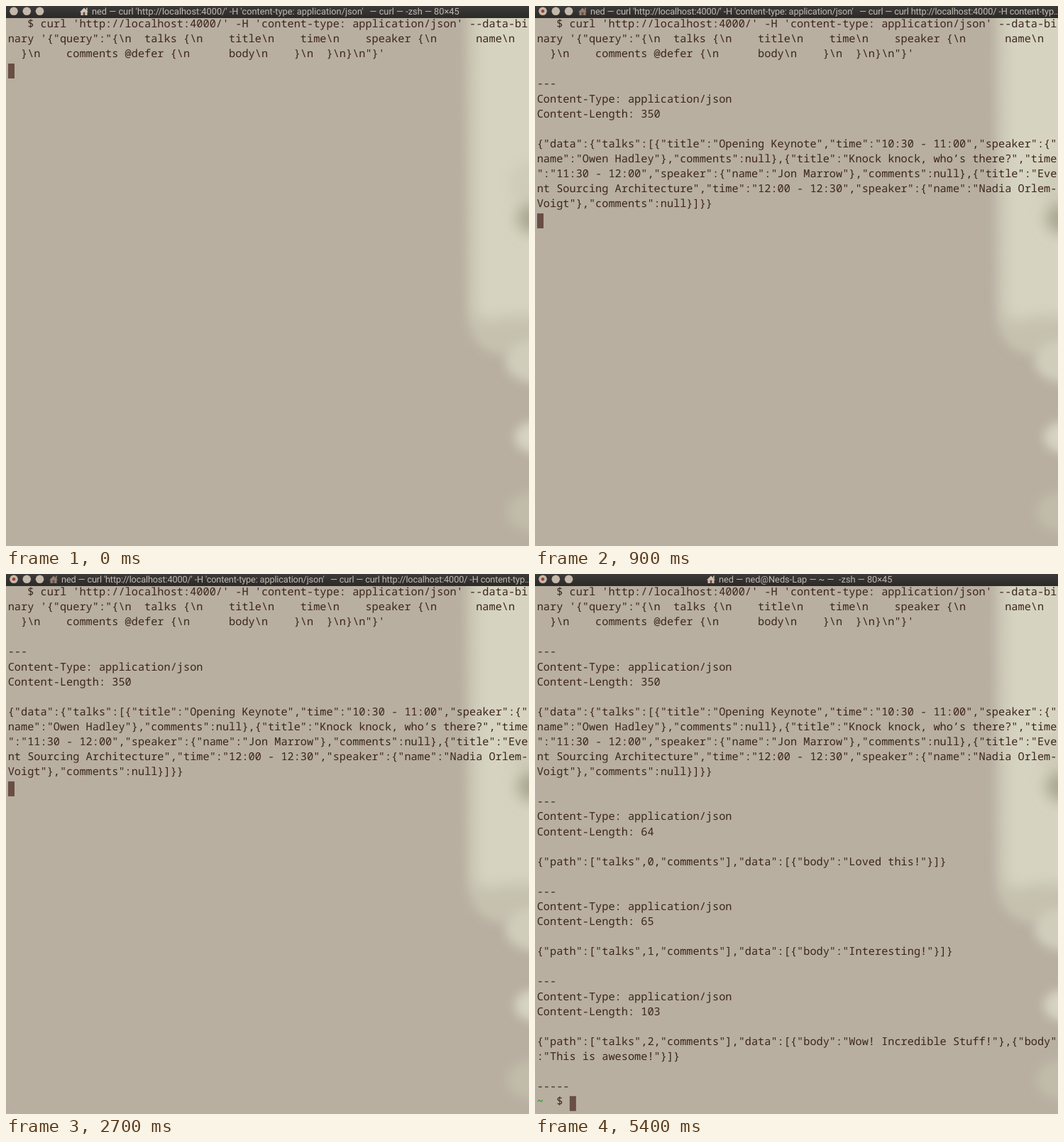
These frames come from a looping animation (737x760 px, 5.58 s). An HTML page:

```html
<!DOCTYPE html>
<html lang="en">
<head>
<meta charset="utf-8">
<title>Deferred query in a terminal</title>
<style>
  html, body { margin: 0; width: 100%; height: 100%; overflow: hidden; background: #b8afa1; }
  #stage { position: relative; width: 737px; height: 760px; overflow: hidden; }
  svg { position: absolute; left: 0; top: 0; }

  pre {
    position: absolute; left: 2.7px; top: 15.1px; margin: 0;
    font: 400 15.28px/21.09px "Noto Sans Mono", "DejaVu Sans Mono", monospace;
    color: #3d251d; text-rendering: geometricPrecision;
    font-variant-ligatures: none;
  }
  .reply { font-weight: 500; }
  .first { top: 99.46px; }
  .rest { top: 310.36px; }
  .home { color: #2f981f; font-weight: 700; }

  #cursor {
    position: absolute; left: 2.7px; top: 80.5px;
    width: 9.2px; height: 21px; background: #684e45;
  }

  .title text {
    font: 400 12.8px Roboto, "Liberation Sans", sans-serif;
    fill: #c3bab0; white-space: pre; text-rendering: geometricPrecision;
  }
  .title .tight { letter-spacing: -.17px; }

  /* One loop: 60, 120, 4560 and 4680 ms of 5580 ms */
  .first, .rest, #cursor, .title, #dot { animation: 5580ms step-end infinite; }
  .first { animation-name: reply; }
  .rest { animation-name: done; }
  #cursor { animation-name: cursor; }
  #t1 { animation-name: t1; }
  #t2 { animation-name: t2; }
  #t3 { animation-name: t3; }
  #t4 { animation-name: t4; }
  #dot { animation-name: dot; }

  @keyframes reply { 0% { visibility: hidden } 1.0752%, 100% { visibility: visible } }
  @keyframes done { 0% { visibility: hidden } 81.7204%, 100% { visibility: visible } }
  @keyframes dot { 0% { visibility: hidden } 2.1505%, 100% { visibility: visible } }
  @keyframes cursor {
    0% { transform: none }
    1.0752% { transform: translate(0, 210.9px) }
    81.7204%, 100% { transform: translate(45.85px, 653.8px) }
  }
  @keyframes t1 { 0% { visibility: visible } 2.1505%, 100% { visibility: hidden } }
  @keyframes t2 {
    0% { visibility: hidden } 2.1505% { visibility: visible } 81.7204%, 100% { visibility: hidden }
  }
  @keyframes t3 {
    0% { visibility: hidden } 81.7204% { visibility: visible } 83.8709%, 100% { visibility: hidden }
  }
  @keyframes t4 { 0% { visibility: hidden } 83.8709%, 100% { visibility: visible } }
</style>
</head>
<body>
<div id="stage">
  <svg width="737" height="760" viewBox="0 0 737 760">
    <defs>
      <filter id="soft" x="-60%" y="-60%" width="220%" height="220%"><feGaussianBlur stdDeviation="7"/></filter>
      <filter id="softer" x="-100%" y="-60%" width="300%" height="220%"><feGaussianBlur stdDeviation="10"/></filter>
    </defs>
    <path d="M648-40H790V492H705Q655 488 650 435Z" fill="#c6c1af" filter="url(#soft)"/>
    <path d="M662-40H790V436H700Q668 452 662 425Z" fill="#d6d4c1" filter="url(#softer)"/>
    <ellipse cx="748" cy="250" rx="40" ry="34" fill="#c9c5b2" opacity=".55" filter="url(#softer)"/>
    <ellipse cx="743" cy="299" rx="23" ry="21" fill="#a9a48f" filter="url(#softer)"/>
    <ellipse cx="745" cy="500" rx="41" ry="30" fill="#d0cdbb" filter="url(#soft)"/>
    <ellipse cx="744" cy="607" rx="27" ry="22" fill="#d6d3c1" filter="url(#soft)"/>
    <ellipse cx="741" cy="712" rx="34" ry="28" fill="#c1bca9" filter="url(#soft)"/>
  </svg>

<pre>   $ curl 'http://localhost:4000/' -H 'content-type: application/json' --data-bi
nary '{"query":"{\n  talks {\n    title\n    time\n    speaker {\n      name\n  
  }\n    comments @defer {\n      body\n    }\n  }\n}\n"}'</pre>

<pre class="reply first">---
Content-Type: application/json
Content-Length: 350

{"data":{"talks":[{"title":"Opening Keynote","time":"10:30 - 11:00","speaker":{"
name":"Owen Hadley"},"comments":null},{"title":"Knock knock, who’s there?","time
":"11:30 - 12:00","speaker":{"name":"Jon Marrow"},"comments":null},{"title":"Eve
nt Sourcing Architecture","time":"12:00 - 12:30","speaker":{"name":"Nadia Orlem-
Voigt"},"comments":null}]}}</pre>

<pre class="reply rest">---
Content-Type: application/json
Content-Length: 64

{"path":["talks",0,"comments"],"data":[{"body":"Loved this!"}]}

---
Content-Type: application/json
Content-Length: 65

{"path":["talks",1,"comments"],"data":[{"body":"Interesting!"}]}

---
Content-Type: application/json
Content-Length: 103

{"path":["talks",2,"comments"],"data":[{"body":"Wow! Incredible Stuff!"},{"body"
:"This is awesome!"}]}

-----
<span class="home">~</span>  $</pre>

  <div id="cursor"></div>

  <svg width="737" height="18" viewBox="0 0 737 18">
    <defs>
      <linearGradient id="bar" x2="0" y2="1">
        <stop stop-color="#3d3b3a"/><stop offset="1" stop-color="#2c2a29"/>
      </linearGradient>
      <g id="house">
        <path d="M-6 1L0-5L6 1H4.5V5.5H-4.5V1Z"/>
        <path d="M3-5h1.7v4H3z"/>
        <path d="M-1.4 1.2h2.8v4.3h-2.8z" fill="#6d4a3c"/>
      </g>
    </defs>
    <rect width="737" height="17" fill="url(#bar)"/>
    <g fill="#c4b9ab">
      <circle cx="11" cy="7.3" r="5.8"/><circle cx="29.3" cy="7.3" r="5.8"/><circle cx="47.6" cy="7.3" r="5.8"/>
    </g>
    <circle id="dot" cx="11" cy="7.3" r="2.2" fill="#a33a2c"/>

    <g class="title" id="t1">
      <use href="#house" x="110" y="7.5" fill="#d0c8b8"/>
      <text y="12"><tspan x="121">ned — curl 'http://localhost:4000/' -H 'content-type: application/json'</tspan><tspan x="512.5">— curl — -zsh — 80×45</tspan></text>
    </g>
    <g class="title" id="t2">
      <use href="#house" x="67" y="7.5" fill="#8f8072"/>
      <text class="tight" y="12"><tspan x="78">ned — curl 'http://localhost:4000/' -H 'content-type: application/json'</tspan><tspan x="457">— curl — curl http://localhost:4000/ -H content-typ…</tspan></text>
    </g>
    <g class="title" id="t3">
      <use href="#house" x="67" y="7.5" fill="#8f8072"/>
      <text class="tight" y="12"><tspan x="78">ned — ned@Neds-Lap — ~ —</tspan><tspan x="244">curl http://localhost:4000/ -H content-type: application/json --data-binary {"query":"{\n  tal…</tspan></text>
    </g>
    <g class="title" id="t4">
      <use href="#house" x="248" y="7.5" fill="#d0c0b0"/>
      <text y="12"><tspan x="259">ned — ned@Neds-Lap — ~ —</tspan><tspan x="428">-zsh — 80×45</tspan></text>
    </g>
  </svg>
</div>
</body>
</html>
```
